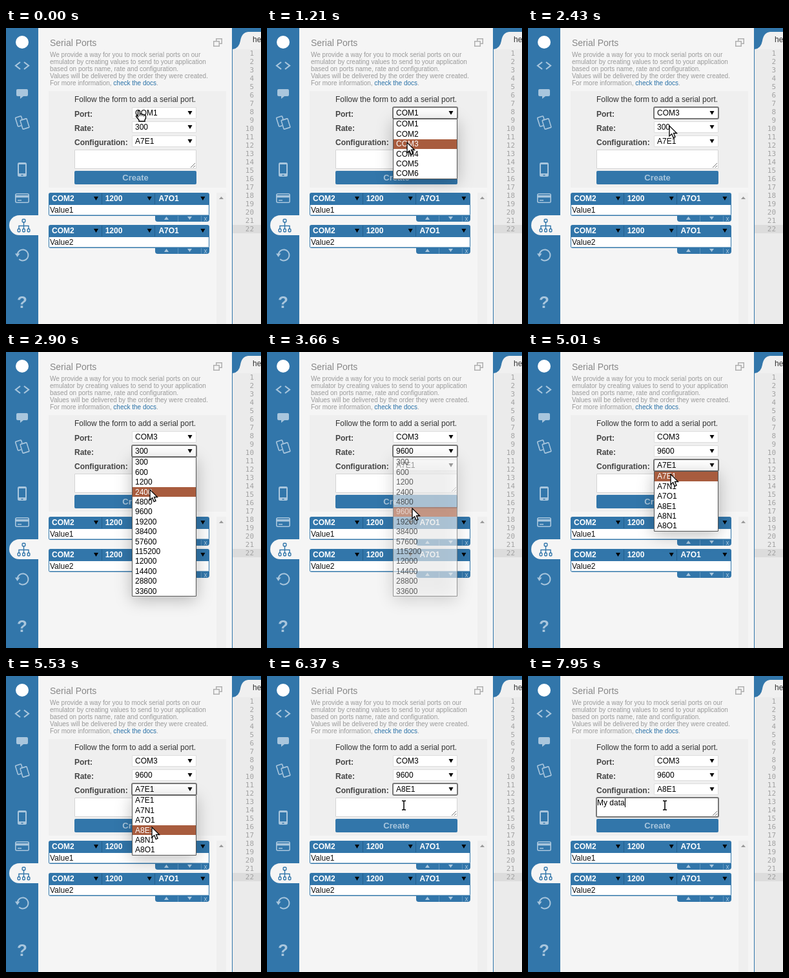
An HTML page with a canvas for the animation above (8000 ms loop, 395x460 px).

```html
<!DOCTYPE html>
<html lang="en">
<head>
<meta charset="utf-8">
<title>Serial Ports</title>
<style>
html, body { margin: 0; width: 100%; height: 100%; overflow: hidden; background: #f5f5f5; }
canvas { display: block; }
</style>
</head>
<body>
<canvas id="stage" width="395" height="460"></canvas>
<script>
const ctx = document.getElementById('stage').getContext('2d');
const LOOP = 8000, STEP = 40, ROW = 15.4;
const SANS = '"Liberation Sans", Arial, sans-serif';
const MONO = '"DejaVu Sans Mono", monospace';
const BLUE = '#3276aa', PALE = '#a9c6dd', PANEL = '#f5f5f5';

const selects = [
  { y: 123, open: 490, full: 530, close: 1670, from: 'COM1', to: 'COM3',
    items: ['COM1', 'COM2', 'COM3', 'COM4', 'COM5', 'COM6'] },
  { y: 145, open: 2470, full: 2510, close: 3660, from: '300', to: '9600',
    items: ['300', '600', '1200', '2400', '4800', '9600', '19200', '38400',
      '57600', '115200', '12000', '14400', '28800', '33600'] },
  { y: 167, open: 4650, full: 4690, close: 6040, from: 'A7E1', to: 'A8E1',
    items: ['A7E1', 'A7N1', 'A7O1', 'A8E1', 'A8N1', 'A8O1'] }
];

// start, end, target x, target y
const moves = [
  [40, 40, 208, 128],
  [670, 1210, 217, 178],
  [1750, 2070, 219, 152],
  [2660, 3140, 225, 243],
  [3740, 4220, 220, 179],
  [4970, 5530, 226, 235],
  [6090, 6370, 212, 201]
];
const FOCUS = 6720;
const typed = 'My data';
const keys = [7200, 7430, 7530, 7640, 7740, 7850, 7950];

function rect(x, y, w, h, fill) {
  ctx.fillStyle = fill;
  ctx.fillRect(x, y, w, h);
}

function round(x, y, w, h, r, fill) {
  ctx.beginPath();
  ctx.roundRect(x, y, w, h, r);
  ctx.fillStyle = fill;
  ctx.fill();
}

function frame(x, y, w, h, color, line = 1, r = 0) {
  ctx.beginPath();
  ctx.roundRect(x + line / 2, y + line / 2, w - line, h - line, r);
  ctx.strokeStyle = color;
  ctx.lineWidth = line;
  ctx.stroke();
}

function text(s, x, y, color, size = 12, weight = '', align = 'left', family = SANS) {
  ctx.font = `${weight} ${size}px ${family}`;
  ctx.textAlign = align;
  ctx.fillStyle = color;
  ctx.fillText(s, x, y);
}

function shape(d, fill, stroke, line = 1) {
  const path = new Path2D(d);
  if (fill) { ctx.fillStyle = fill; ctx.fill(path); }
  if (stroke) {
    ctx.strokeStyle = stroke;
    ctx.lineWidth = line;
    ctx.stroke(path);
  }
}

function at(x, y, draw, turn = 0) {
  ctx.save();
  ctx.translate(x, y);
  ctx.rotate(turn);
  draw();
  ctx.restore();
}

function triangle(x, y, w, h, color) {
  shape(`M${x - w / 2} ${y - h / 2}h${w}L${x} ${y + h / 2}Z`, color);
}

function sidebar() {
  rect(0, 0, 50, 460, BLUE);
  ctx.beginPath();
  ctx.arc(25, 22, 10, 0, 7);
  ctx.fillStyle = '#fff';
  ctx.fill();

  shape('M22 53L15 58.5L22 64M28 53L35 58.5L28 64', null, PALE, 2.2);
  shape('M18 95H32Q34 95 34 97V104Q34 106 32 106H27L22 110V106H18Q16 106 16 104V97Q16 95 18 95Z', PALE);
  at(21, 145, () => frame(-5.5, -8, 11, 16, PALE, 1.6, 1), -0.3);
  at(29, 149, () => {
    round(-6, -8, 12, 16, 1, BLUE);
    frame(-6, -8, 12, 16, PALE, 1.6, 1);
  }, -0.3);

  round(18, 209, 14, 22, 2.5, PALE);
  rect(20, 212, 10, 14, BLUE);
  rect(23.5, 228, 3, 1.5, BLUE);
  frame(14, 257, 22, 15, PALE, 1.6, 2);
  rect(14, 260, 22, 3.5, PALE);
  rect(18, 267, 6, 1.5, PALE);

  round(5, 291, 45, 31, [16, 0, 0, 16], PANEL);
  shape('M27.5 302V312M20 312V307.5H35V312M27.5 307V312', null, BLUE, 1.4);
  frame(24.5, 296.5, 6, 6, BLUE, 1.4, 1);
  for (const x of [17.5, 25, 32.5]) frame(x, 311.5, 5, 6, BLUE, 1.4, 1);

  ctx.beginPath();
  ctx.arc(26, 353, 8.5, 3.3, 8.6);
  ctx.strokeStyle = PALE;
  ctx.lineWidth = 2;
  ctx.stroke();
  shape('M14 350.5H21.5L17.5 356Z', PALE);
  text('?', 25, 435, PALE, 26, 'bold', 'center');
}

function editor() {
  rect(351, 0, 44, 460, '#ebebeb');
  rect(350, 0, 1, 460, BLUE);
  rect(351, 0, 44, 33, BLUE);
  shape('M351 33Q361 32 363 20Q365 7 375 6H395V33Z', '#f0f0f0');
  text('he', 382, 22, '#333');
  rect(351, 306, 44, 13, '#dcdcdc');
  for (let i = 1; i <= 22; i++) {
    text(i, 384, 30 + i * 13, '#a2a2a2', 11, '', 'right', MONO);
  }
}

function intro() {
  text('Serial Ports', 68, 28, '#888', 14);
  frame(325, 16, 10, 9, '#b0b0b0', 1.5);
  rect(321, 20, 10, 9, PANEL);
  frame(321, 20, 10, 9, '#b0b0b0', 1.5);
  const last = 'For more information, ', link = 'check the docs';
  [
    'We provide a way for you to mock serial ports on our',
    'emulator by creating values to send to your application',
    'based on ports name, rate and configuration.',
    'Values will be delivered by the order they were created.',
    last
  ].forEach((s, i) => text(s, 68, 45 + i * 11, '#999', 10));
  const x = 68 + ctx.measureText(last).width;
  text(link, x, 89, '#2a72a8', 10);
  text('.', x + ctx.measureText(link).width, 89, '#999', 10);
}

function entry(y, value) {
  round(66, y, 249, 36, 3, BLUE);
  rect(67, y + 19, 247, 15.5, '#fff');
  text(value, 68, y + 31, '#111');
  ['COM2', '1200', 'A7O1'].forEach((s, i) => {
    const x = 66 + i * 82.7;
    if (i) rect(Math.round(x) - 1, y + 1, 1, 17, '#245f8c');
    text(s, x + 5, y + 13, '#fff', 12, 'bold');
    triangle(x + 73.5, y + 9, 7, 6, '#000');
  });
  round(231, y + 35, 84, 10, [0, 0, 4, 4], BLUE);
  rect(266, y + 36, 1, 9, '#5d93bd');
  rect(302, y + 36, 1, 9, '#5d93bd');
  triangle(248.5, y + 39.5, 7, -5, PALE);
  triangle(284.5, y + 39.5, 7, 5, PALE);
  text('x', 309, y + 43.5, PALE, 10, '', 'center');
}

function form(t) {
  rect(66, 98, 275, 150, '#efefef');
  text('Follow the form to add a serial port.', 106, 115, '#333');
  ['Port:', 'Rate:', 'Configuration:'].forEach((s, i) =>
    text(s, 106, 138 + i * 22, '#444', 12, 'bold'));

  selects.forEach((s, i) => {
    const next = selects[i + 1];
    const focused = t >= s.open && t < (next ? next.open : FOCUS);
    rect(195, s.y, 100, 18, '#fff');
    if (focused) frame(194, s.y - 1, 102, 20, '#777', 2, 2);
    else frame(195, s.y, 100, 18, '#ddd');
    text(t < s.close ? s.from : s.to, 200, s.y + 13, '#000');
    triangle(285, s.y + 9, 7, 6, '#000');
  });

  rect(106, 189, 189, 30, '#fff');
  if (t >= FOCUS) frame(105, 188, 191, 32, '#777', 2, 2);
  else frame(106, 189, 189, 30, '#d4d4d4');
  shape('M286 217L293 210M290 217L293 214', null, '#777');
  const s = typed.slice(0, keys.filter(k => t >= k).length);
  text(s, 107, 201, '#000');
  if (t >= FOCUS) rect(Math.round(107 + ctx.measureText(s).width), 190, 1, 14, '#000');

  round(106, 222, 189, 21, 2, BLUE);
  text('Create', 200.5, 237, '#a9c6dd', 13, 'bold', 'center');
}

function opacity(s, t) {
  if (t < s.open || t >= s.close + 80) return 0;
  if (t < s.full) return 0.5;
  return t < s.close ? 1 : t < s.close + 40 ? 0.6 : 0.25;
}

function popup(s, t, mouse) {
  const alpha = opacity(s, t);
  if (!alpha) return;
  const top = s.y + 18, h = s.items.length * ROW + 1.6;
  const picked = t < s.close
    ? Math.max(0, Math.floor((mouse.y - top - 1) / ROW))
    : s.items.indexOf(s.to);
  ctx.save();
  ctx.globalAlpha = alpha;
  ctx.shadowColor = 'rgba(0,0,0,.26)';
  ctx.shadowBlur = 24;
  ctx.shadowOffsetY = 5;
  rect(195, top, 100, h, '#fff');
  ctx.shadowColor = 'transparent';
  s.items.forEach((item, i) => {
    const y = top + 1 + i * ROW;
    if (i === picked) rect(196, Math.round(y), 98, 15, '#a85c3e');
    text(item, 200, Math.round(y + 11.4), i === picked ? '#fff' : '#000');
  });
  frame(195, top, 100, Math.round(h), '#555');
  ctx.restore();
}

function pointer(t) {
  let x = 206, y = 128;
  for (const [start, end, tx, ty] of moves) {
    if (t < start) break;
    const steps = Math.floor((end - start) / STEP + 1);
    const p = Math.min(1, Math.floor((t - start) / STEP + 1) / steps);
    const e = 1 - Math.pow(1 - p, 1.5);
    x += (tx - x) * e;
    y += (ty - y) * e;
  }
  return { x: Math.round(x), y: Math.round(y) };
}

function cursorKind(t, y) {
  if (selects.some(s => t >= s.full - 80 && t < s.close + 40)) return 'arrow';
  if (y >= 189 && y < 219) return 'beam';
  const overSelect = selects.some(s => y >= s.y && y < s.y + 18);
  return overSelect || (y >= 222 && y < 243) ? 'hand' : 'arrow';
}

const cursors = {
  arrow() {
    shape('M0 0V16L3.7 12.6L6.2 18.6L9 17.4L6.5 11.5H11.5Z', '#fff', '#000', 1.3);
  },
  hand() {
    shape('M-1.5 1.5Q0 -1 1.5 1.5V6Q3.5 4.5 4.7 6.6Q6.6 5.4 7.6 7.4Q10 6.6 10.5 9V12L9 15V17H0V15' +
      'L-4.5 9.5Q-4.5 7.5 -2.5 8.3L-1.5 9.5Z', '#fff', '#000', 1.4);
    shape('M1.5 6V9M4.7 6.6V9M7.6 7.4V9.5', null, '#000');
  },
  beam() {
    const d = 'M-3 -7H-1L0 -6L1 -7H3M0 -6V6M-3 7H-1L0 6L1 7H3';
    shape(d, null, '#fff', 3.4);
    shape(d, null, '#000', 1.5);
  }
};

function draw(t) {
  rect(0, 0, 395, 460, PANEL);
  sidebar();
  editor();
  intro();
  form(t);
  rect(326, 256, 15, 204, '#efefef');
  triangle(333.5, 264, 7, -4, '#999');
  entry(256, 'Value1');
  entry(306, 'Value2');
  const mouse = pointer(t);
  selects.forEach(s => popup(s, t, mouse));
  at(mouse.x, mouse.y, cursors[cursorKind(t, mouse.y)]);
}

function tick() {
  draw(performance.now() % LOOP);
  requestAnimationFrame(tick);
}
tick();
</script>
</body>
</html>
```
